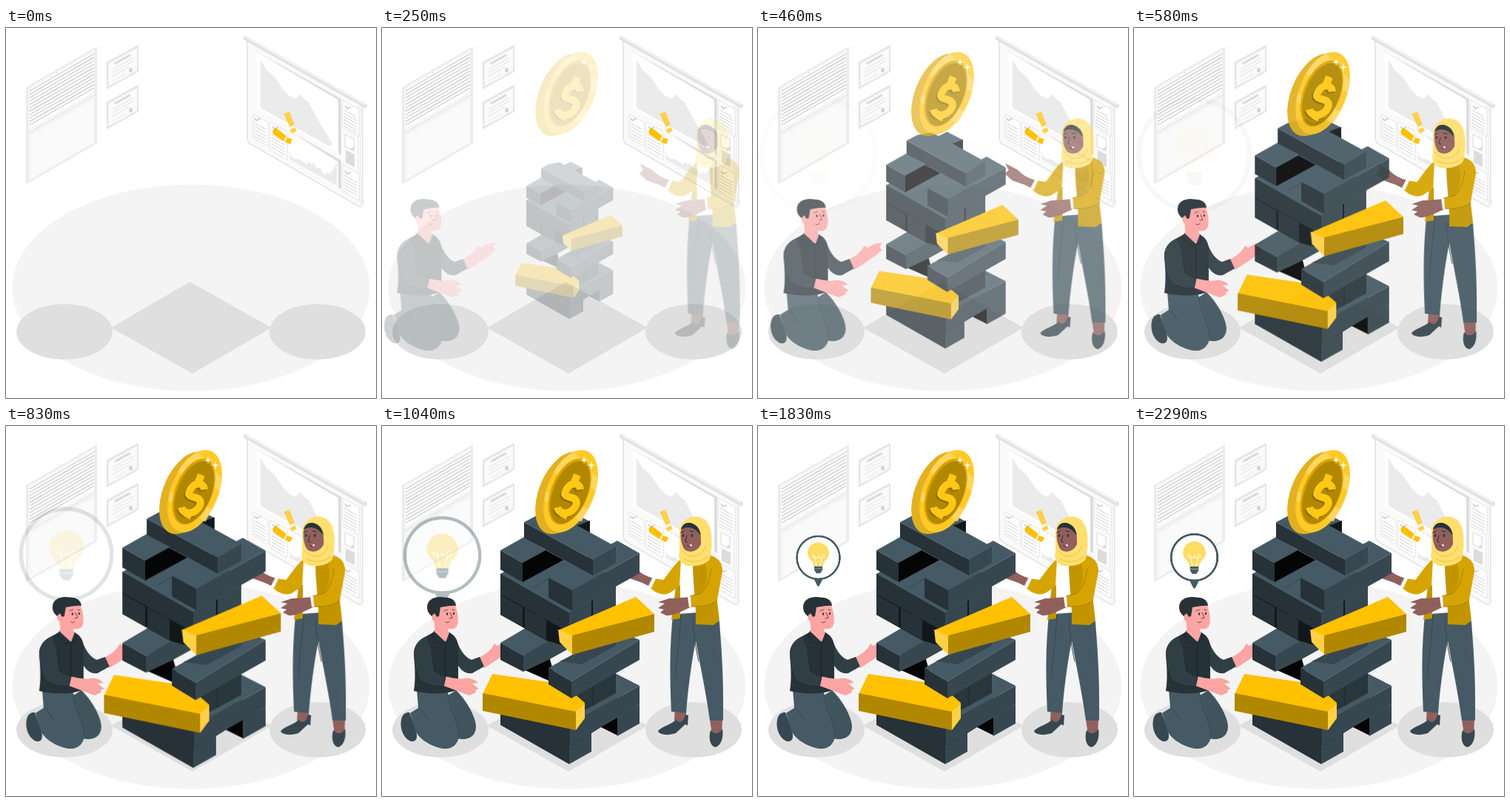
An HTML page for the animation above (2330 ms loop, 500 px wide and 500 px high).

```html
<!DOCTYPE html>
<html lang="en">
<head>
<meta charset="utf-8">
<title>Tower of blocks</title>
<style>
html, body { margin: 0; width: 100%; height: 100%; overflow: hidden; background: #fff; }
svg { display: block; width: 100%; height: 100%; }
.t { fill: #455a64; } .l { fill: #263238; } .r { fill: #37474f; } .k { fill: #050505; }
.skin { fill: #fca5a3; } .brown { fill: #90605c; } .shirt { fill: #303e45; }
.gold { fill: #ffc100; } .dim { fill: #b28700; } .lit { fill: #ffd045; }
.line { fill: none; stroke-linecap: round; stroke-linejoin: round; }
#tower, #man, #woman, #coin, #bubble, #bulb { animation: 2330ms linear infinite; }
#tower { animation-name: grow; transform-origin: 253.5px 288px; }
#man { animation-name: fromLeft; }
#woman { animation-name: fromRight; }
#coin { animation-name: fade; }
#bubble { animation-name: shrink; }
#bubble .ring { animation: ring 2330ms linear infinite; transform-origin: 81.5px 182px; }
#bulb { animation-name: bulb; transform-origin: 81.5px 184px; }
@keyframes grow {
  0%, .35% { opacity: 0; transform: scale(.5); animation-timing-function: cubic-bezier(.36,-.01,.5,1.38); }
  40.3%, 100% { opacity: 1; transform: none; }
}
@keyframes fromLeft {
  0%, .35% { opacity: 0; transform: translateX(-30px); animation-timing-function: cubic-bezier(.36,-.01,.5,1.38); }
  40.3%, 100% { opacity: 1; transform: translateX(0); }
}
@keyframes fromRight {
  0%, .35% { opacity: 0; transform: translateX(30px); animation-timing-function: cubic-bezier(.36,-.01,.5,1.38); }
  40.3%, 100% { opacity: 1; transform: translateX(0); }
}
@keyframes fade {
  0%, .35% { opacity: 0; animation-timing-function: cubic-bezier(.36,-.01,.5,1.38); }
  40.3%, 100% { opacity: 1; }
}
@keyframes shrink {
  0%, 14.2% { opacity: 0; } 24.9% { opacity: .04; } 35.6% { opacity: .16; }
  49.4% { opacity: .53; } 57.1% { opacity: .76; } 64.4% { opacity: .91; } 71.7%, 100% { opacity: 1; }
}
@keyframes ring {
  0%, 14.2% { transform: scale(2.5); } 24.9% { transform: scale(2.37); } 35.6% { transform: scale(1.94); }
  49.4% { transform: scale(1.43); } 57.1% { transform: scale(1.155); } 64.4% { transform: scale(1.025); }
  71.7% { transform: scale(.95); } 78.5% { transform: scale(.915); } 88% { transform: scale(.935); }
  98.3%, 100% { transform: scale(.99); }
}
@keyframes bulb {
  0%, 14.2% { transform: scale(1.88); } 24.9% { transform: scale(1.8); } 35.6% { transform: scale(1.54); }
  49.4% { transform: scale(1.26); } 57.1% { transform: scale(1.11); } 64.4% { transform: scale(1.015); }
  71.7% { transform: scale(.965); } 78.5% { transform: scale(.935); } 88% { transform: scale(.95); }
  98.3%, 100% { transform: scale(.99); }
}
</style>
</head>
<body>
<svg viewBox="0 0 500 500">
  <g id="floor">
    <ellipse cx="250" cy="351" rx="241.5" ry="139.5" fill="#f4f4f4"/>
    <g fill="#dfdfdf">
      <path d="M248.500 343 359 405 252 467 142 405z"/>
      <ellipse cx="79" cy="410.500" rx="65" ry="37.500"/>
      <ellipse cx="421" cy="410.500" rx="65" ry="37.500"/>
    </g>
  </g>

  <g id="window">
    <path d="M27 80 123 25V156L27 211z" fill="#ebebeb"/>
    <path d="M30 80.500 120 29V155L30 207z" fill="#f5f5f5"/>
    <path d="M32 82 119 32V86L32 136z" fill="#fff"/>
    <path d="M33 146 118 97V155L33 204z" fill="#fafafa"/>
    <path d="M29 143 121 90" stroke="#e9e9e9" stroke-width="1.500"/>
    <path id="slats" stroke="#cdcdcd" stroke-width="1.300"/>
  </g>

  <g id="awards">
    <g id="award">
      <path d="M136 46 179 22.500V59L136 83z" fill="#e6e6e6"/>
      <path d="M138.500 48 177 27V57.500L138.500 79z" fill="#fafafa"/>
      <path d="M147 48 168 36.500" stroke="#dadada" stroke-width="3"/>
      <path d="M144 56 172 40.500M144 60.500 172 45M144 65 166 53M148 70 162 62" stroke="#e4e4e4"/>
      <ellipse cx="168.500" cy="57" rx="2.500" ry="3.300" fill="#d6d6d6"/>
    </g>
    <use href="#award" y="54"/>
  </g>

  <g id="board">
    <path d="M326 15 482 104V238Q481 244 475 240L331 157Q326 154 326 148z" fill="#fafafa" stroke="#dedede" stroke-width="1.300"/>
    <path d="M476 104V234M479 106V238" stroke="#e9e9e9"/>
    <path d="M324 14 485 105" stroke="#e2e2e2" stroke-width="6" stroke-linecap="round"/>
    <path d="M325 12.500 485 103" stroke="#f2f2f2" stroke-width="3"/>
    <path d="M336 30 453 96V172L449 170V98z" fill="#dcdcdc"/>
    <path d="M339 33 449 97V170L339 108z" fill="#fff"/>
    <path d="M344 43 352 57 363 66 373 81 383 92 391 96 397 89 404 97 409 100 418 118 425 130 430 138 441 157 437 160 344 108z" fill="#ebebeb"/>
    <path d="M383 139 453 179V218L449 216V181z" fill="#dcdcdc"/>
    <path d="M383 142 449 181V216L383 178z" fill="#fff"/>
    <path d="M384 171 389 177 396 177 402 182 407 184 409 181 413 184 416 182 420 189 425 190 430 198 434 195 438 197 443 190 447 182V213L384 178z" fill="#ebebeb"/>
    <g fill="#fff" stroke="#e4e4e4">
      <path d="M455 97 477 110V147L455 135zM334 116 354 128V160L334 148zM357 127 380 140V178L357 165zM455 184 477 197V233L455 220z"/>
    </g>
    <path d="M459 165 471 171V188L459 182z" fill="#dcdcdc"/>
    <path d="M458 144 470 150V166L458 160z" fill="#fff" stroke="#e2e2e2" stroke-width="1.300"/>
    <path d="M466 164 470 162" stroke="#d0d0d0" stroke-width="2"/>
    <path id="notes" fill="none" stroke="#dcdcdc" stroke-width="1.200"/>
    <path d="M336 122 339 125 344 122M360 133 363 136 368 134M458 105 461 109 466 107M458 193 461 197 466 195" fill="none" stroke="#bbb" stroke-width="1.200"/>
    <path d="M375.500 116 383 113 390 131 383.500 134zM383.500 138 390.500 134 393 139 386 142.500z" fill="#ffd04a"/>
    <path d="M361 143Q359 137 365 135L379 146 375 153zM380 148 387 150.500 384 157 377 154z" class="gold"/>
  </g>

  <g id="bubble">
    <g class="ring" fill="#fff" stroke="#455a64">
      <path d="M74 207H89L83 219Q81.500 221 80 219z" fill="#455a64" stroke="none"/>
      <circle cx="81.500" cy="177.500" r="31.600" stroke-width="2.800"/>
    </g>
    <g id="bulb">
      <path d="M75 190C75 182 66 180 66 171A15.500 15.500 0 0 1 97 171C97 180 88 182 88 190z" fill="#ffdc63"/>
      <path d="M79 189 76 177Q72 178 73 174 76 172 77 177 80 180 81.500 175 83 180 86 177 87 172 90 174 91 178 87 177L84 189" class="line" stroke="#fff4cf" stroke-width="1.300"/>
      <path d="M75.500 190H87.500V195L84.500 200H78.500L75.500 195z" fill="#455a64"/>
      <path d="M76 193.500H87" stroke="#90a4ae"/>
    </g>
  </g>

  <g id="man">
    <path d="M131 313C140 308 147 304 152 294L156 297 165 292 176 290 173 296 176 300 168 307C158 314 148 321 138 327z" class="skin"/>
    <path d="M100 288C105 302 112 313 121 316L132 312 138 325 122 334C112 336 104 328 100 318z" class="shirt"/>
    <path d="M100 357C112 368 127 392 127 407C126 423 112 425 100 422L68 378z" fill="#40545e"/>
    <path d="M37 387C28 386 24 396 26 408 28 420 37 428 43 426 49 424 47 416 45 408z" class="r"/>
    <path d="M47 356 89 360C95 384 107 408 103 424 98 437 86 438 74 434 60 429 51 422 46 414L38 388 49 381z" class="t"/>
    <path d="M89 364C91 382 102 397 104 417M51 381 62 396" class="line" stroke="#34454d"/>
    <path d="M70 257 89 270 90 282 86 292 72 282z" class="skin"/>
    <path d="M71 278 86 292 91 279C99 283 103 290 103 300L103 356C86 364 60 362 43 358 46 340 44 322 43 308 43 297 49 289 60 284z" class="l"/>
    <path d="M71 277 67 282 77 294 86 292M91 279 93 290 86 292V340" class="line" stroke="#1a2327"/>
    <path d="M83 338C95 340 105 343 112 341 119 340 126 343 130 347L122 348 131 355 126 357 127 360 118 364 112 362C102 358 92 354 83 351z" class="skin"/>
    <path d="M60 285C50 288 43 297 43 308 44 326 49 341 57 347 65 351 74 352 83 353L86 339 71 331 68 306z" class="shirt"/>
    <path d="M67 304 71 331 86 339 83 352C72 352 62 350 56 346" class="line" stroke="#1d282d"/>
    <path d="M73 250 79 242 98 240C102 250 105 262 101 271 96 277 85 274 80 268L72 266Q67 262 67 257z" class="skin"/>
    <path d="M61 245C61 236 68 231 79 231L89 232C96 233 100 238 100 243 94 242 86 244 79 245L77 257 74 258 71 253 67 257C63 253 61 250 61 245z" class="l"/>
    <path d="M84 250 89 248M95 248 98 249M92 252 95 259 91 260M86 265Q90 267 91 264" class="line" stroke="#7d3f3f"/>
    <ellipse cx="88" cy="254" rx="1.200" ry="1.800" class="l"/>
    <ellipse cx="97" cy="253.500" rx="1.100" ry="1.700" class="l"/>
  </g>

  <g id="woman">
    <path d="M368 206C356 203 348 198 343 192L326 183 330 192 325 197 335 206 352 212 362 217z" class="brown"/>
    <path d="M396 380H411V392L400 406 395 397zM443 396H460L459 420 446 418z" class="brown"/>
    <path d="M414 391 413 405 410 403 397 415C386 419 374 417 373 412 380 405 392 403 397 397 402 403 408 399 410 390z" class="r"/>
    <path d="M444 411C441 421 443 432 450 434 458 433 462 421 460 409 456 417 449 417 444 411z" class="r"/>
    <path d="M394 248 430 250 456 264C458 295 462 330 461 398H443C438 360 430 325 424 290 418 320 413 360 411 388L391 386C389 345 388 295 394 248z" class="t"/>
    <path d="M420 262C422 290 425 305 428 318M404 256C403 280 398 310 397 340" class="line" stroke="#37474f"/>
    <path d="M402 183 424 186 427 252 401 254z" fill="#fff"/>
    <path d="M403 215 397 218 391 262 403 260z" fill="#c29500"/>
    <path d="M404 180C394 187 385 203 380 208L368 206 362 218C371 228 384 230 391 224L402 217z" fill="#d6a400"/>
    <path d="M366 204 370 206 364 219 360 216z" fill="#fff"/>
    <path d="M440 176 456 182 453 237 456 263 448 269 424 268C425 240 420 215 420 187z" fill="#c29500"/>
    <path d="M417 231C405 232 395 233 388 233L373 238 382 240 373 246 381 248 376 252 384 256C394 257 405 250 417 245z" class="brown"/>
    <path d="M442 175C453 176 461 185 460 197L453 234C450 241 434 244 418 244L416 230 432 226C437 218 442 204 437 188z" fill="#d6a400"/>
    <path d="M445 193C443 210 438 220 432 226L416 230 418 244C432 245 446 242 452 236" class="line" stroke="#a87f00"/>
    <path d="M413 231 417 230 418 244 415 245z" fill="#fff"/>
    <path d="M402 140C405 127 417 120 429 123 445 127 449 150 443 179 439 188 424 190 413 189 404 187 399 180 402 170z" fill="#ffe06f"/>
    <path d="M404 142C405 133 411 130 419 132 429 136 432 147 431 160 426 170 416 172 409 167 404 160 403 150 404 142z" class="brown"/>
    <path d="M404 140C406 132 413 129 420 132 427 135 430 141 431 148 425 139 414 133 404 140z" class="l"/>
    <path d="M404 144 408 142M416 142 421 143M412 148 410 156 413 157M413 162Q417 164 419 160" class="line" stroke="#40282a"/>
    <path d="M415 161 419 159.500 418 163z" fill="#fff"/>
    <ellipse cx="407" cy="148" rx="1.200" ry="1.900" class="l"/>
    <ellipse cx="419" cy="148" rx="1.300" ry="2" class="l"/>
    <path d="M405 168C415 181 432 178 437 163M408 180C420 186 434 183 441 176" class="line" stroke="#e2bf48"/>
  </g>

  <g id="tower">
    <!-- base rows -->
    <path d="M160 385 254 400 318 350V393L253 434z" class="l"/>
    <path d="M283 414 318 393V418L294 406z" class="k"/>
    <path d="M318 393 348 377V402L318 419z" class="r"/>
    <path d="M160 379 253 432V457L160 404z" class="l"/>
    <path d="M253 432 283 414V440L253 457z" class="r"/>
    <path d="M222 384 254 402V431L222 413z" class="l"/>
    <path d="M254 402 348 351V377L254 431z" class="r"/>
    <path d="M222 384 315 334 348 351 254 402z" class="t"/>
    <path d="M262 350 316 322V361L285 378 262 390z" fill="#29363c"/>
    <path d="M285 352V378" stroke="#1d282d"/>
    <!-- lower bar -->
    <path d="M149 335 245 349 274 374 262 387 136 362z" class="gold"/>
    <path d="M136 361 262 386V411L136 385z" class="dim"/>
    <path d="M262 386 274 374V395L262 411z" class="lit"/>
    <!-- middle rows -->
    <path d="M191 329 225 308 236 348 225 344z" class="k"/>
    <path d="M160 293 194 273 240 278 236 290 191 310z" class="t"/>
    <path d="M160 293 191 310V332L160 316z" class="l"/>
    <path d="M191 310 236 284 254 300 225 316 191 332z" class="r"/>
    <path d="M225 327 316 276 348 289 256 345z" class="t"/>
    <path d="M240 318 316 285V297L270 322z" class="r"/>
    <path d="M225 327 256 345V368L225 349z" class="l"/>
    <path d="M256 345 348 289V316L256 368z" class="r"/>
    <path d="M160 200 190 184 316 200V243L258 300 222 290 160 255z" fill="#11181b"/>
    <path d="M160 228 190 245V271L160 255zM193 246 222 262V290L193 273z" class="l"/>
    <path d="M160 200 222 166 316 218 253 253z" class="t"/>
    <path d="M160 200 253 253V279L160 227z" class="l"/>
    <path d="M253 253 283 236V262L253 279zM285 235 316 218V243L285 261z" class="r"/>
    <path d="M190 208 222 190M206 217 240 199" stroke="#37474f"/>
    <!-- upper bar -->
    <path d="M238 276 343 231 368 254 257 284z" class="gold"/>
    <path d="M238 275 257 283V309L240 292z" class="lit"/>
    <path d="M257 283 368 254V278L257 309z" class="dim"/>
    <!-- top rows -->
    <path d="M160 168 192 150 221 167 190 185z" class="t"/>
    <path d="M160 168 190 185V211L160 194z" class="l"/>
    <path d="M190 185 221 168 245 181 190 211z" class="k"/>
    <path d="M225 205 318 155 348 172 257 222z" class="t"/>
    <path d="M225 205 257 222V250L225 232z" class="l"/>
    <path d="M257 222 348 172V199L257 250z" class="r"/>
    <path d="M235 126 256 116 281 129 262 140z" class="t"/>
    <path d="M255 138 281 128V146z" fill="#11181b"/>
    <path d="M192 130 209 121 232 117 316 163 285 181z" class="t"/>
    <path d="M192 130 285 181V202L192 151z" class="l"/>
    <path d="M285 181 316 163V185L285 202z" class="r"/>
  </g>

  <g id="coin">
    <g id="edge" fill="#e3b021">
      <ellipse cx="244" cy="90.500" rx="32" ry="58.500" transform="rotate(22 244 90.500)"/>
      <ellipse cx="249" cy="89.500" rx="32" ry="58.500" transform="rotate(22 249 89.500)"/>
    </g>
    <g transform="rotate(22 255 88)">
      <ellipse cx="255" cy="88" rx="32" ry="58.500" fill="#ffc928"/>
      <path d="M224 73Q226 52 239 37L283 58 286 74zM286 102 224 102 227 112 284 121z" fill="#ffdb6b" opacity=".8"/>
      <ellipse cx="254" cy="89" rx="25" ry="47" fill="#d9a400"/>
      <ellipse cx="255" cy="90" rx="23" ry="44.500" class="dim"/>
    </g>
    <g id="dollar" fill="none" stroke-width="10">
      <path d="M268 86C266 74 254 77 249 86 243 96 253 95 259 98 267 102 261 112 254 116 246 120 239 117 237 110" stroke="#8f6c00" transform="translate(-2 2)"/>
      <path d="M268 86C266 74 254 77 249 86 243 96 253 95 259 98 267 102 261 112 254 116 246 120 239 117 237 110M259 78 264 66M249 114 244 124" stroke="#ffc814"/>
    </g>
    <path d="M283 47 284 52 289 53 284 54 283 60 282 54 277 53 282 52zM273 41 274 45 278 46 274 47 273 51 272 47 268 46 272 45z" fill="#fff"/>
  </g>
</svg>
<script>
const byId = id => document.getElementById(id);

// Parallel strokes, each one a gap below the last.
const strokes = (x, y, w, rise, n, gap) =>
  Array.from({ length: n }, (_, i) => `M${x} ${y + i * gap}l${w} ${rise}`).join("");

byId("slats").setAttribute("d", strokes(32, 85, 87, -50, 11, 4.6));
byId("notes").setAttribute("d", [
  strokes(336, 128, 15, 9, 5, 4.5),
  strokes(359, 139, 18, 10, 6, 4.5),
  strokes(457, 111, 17, 10, 6, 4.3),
  strokes(457, 199, 17, 10, 5, 4.3)
].join(""));
</script>
</body>
</html>
```
